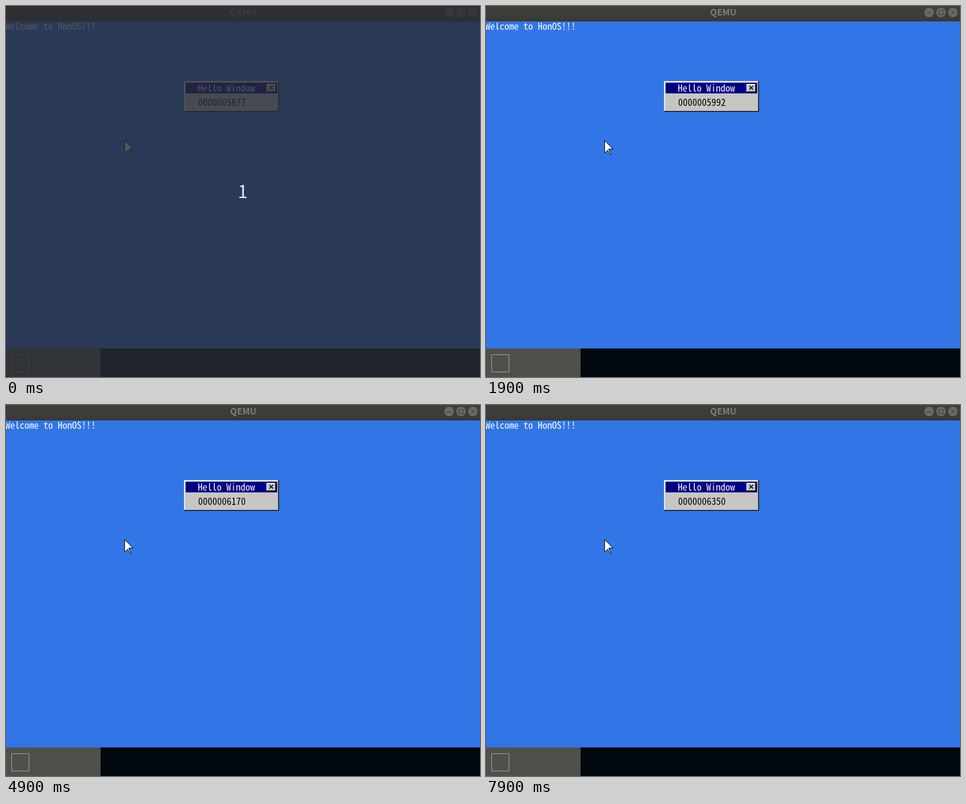
Write an HTML page that moves like this. It is 797 px wide and 624 px high and loops after 8 s.

```html
<!DOCTYPE html>
<html lang="en">
<head>
<meta charset="utf-8">
<title>QEMU desktop</title>
<style>
  html, body { margin: 0; width: 100%; height: 100%; overflow: hidden; background: #3275e6; }
  svg { display: block; width: 797px; height: 624px; }
  .mono { font: 300 16px "Noto Sans Mono CJK JP", "Noto Sans Mono", monospace; white-space: pre; }
  .ui { font-family: "Noto Sans CJK JP", "Noto Sans", sans-serif; text-anchor: middle; }
  .crisp { shape-rendering: crispEdges; }
</style>
</head>
<body>
<svg viewBox="0 0 797 624">
  <defs>
    <linearGradient id="bar" x2="0" y2="1">
      <stop stop-color="#403f3a"/>
      <stop offset="1" stop-color="#3a3934"/>
    </linearGradient>
  </defs>

  <!-- Host title bar -->
  <rect width="797" height="26" fill="url(#bar)"/>
  <text class="ui" x="399" y="16" font-size="14.67" font-weight="700" fill="#827f78">QEMU</text>
  <g fill="#6a6962">
    <circle cx="745" cy="11" r="8"/>
    <circle cx="765" cy="11" r="8"/>
    <circle cx="785" cy="11" r="8"/>
  </g>
  <path d="M741 11.5h8M761.5 7.5h7v7h-7zM782 8l6 6m0-6l-6 6" fill="none" stroke="#3c3b37"/>

  <!-- Desktop and taskbar -->
  <g class="crisp">
    <rect y="26" width="797" height="550" fill="#3275e6"/>
    <rect y="576" width="797" height="48" fill="#01080f"/>
    <rect y="576" width="159" height="48" fill="#50504b"/>
    <rect x="9.5" y="586.5" width="29" height="29" fill="none" stroke="#a0a09c"/>
  </g>
  <text class="mono" x="-1" y="40" fill="#fff">Welcome to HonOS!!!</text>

  <!-- Window -->
  <g transform="translate(299 126)">
    <g class="crisp">
      <rect width="160" height="52" fill="#000"/>
      <rect width="159" height="51" fill="#c6c6c3"/>
      <path d="M1.5 50V1.5H158" fill="none" stroke="#fff"/>
      <path d="M1 50.5H158.5V1" fill="none" stroke="#848484"/>
      <rect x="3" y="3" width="154" height="18" fill="#000084"/>
      <g transform="translate(139 5)">
        <rect width="16" height="14" fill="#000"/>
        <rect width="15" height="13" fill="#fff"/>
        <rect x="1" y="1" width="14" height="12" fill="#848484"/>
        <rect x="1" y="1" width="13" height="11" fill="#c6c6c3"/>
      </g>
    </g>
    <path d="M144 8.5l6 6m0-6l-6 6" stroke="#000" stroke-width="1.7"/>
    <text class="mono" x="23.5" y="18" fill="#fff">Hello Window</text>
    <text class="mono" id="counter" x="24" y="42" fill="#000"></text>
  </g>

  <!-- Pointer -->
  <path transform="translate(199 226)" fill="#fff" stroke="#000"
    d="M.5.5L14.5 14.5H7.5V15.5L11.5 23.5H9.5L5.5 16.5L.5 21.5Z"/>

  <!-- Recording countdown -->
  <g id="countdown">
    <rect width="797" height="624" fill="#282c33" opacity=".8"/>
    <text class="ui" x="398" y="323" font-size="30" fill="#dcebfa">1</text>
  </g>
</svg>
<script>
  const LOOP = 8000, STEP = 100;
  // The emulated counter drifts slightly around 60 counts per second: [step, value].
  const PACE = [[0, 5877], [1, 5883], [11, 5944], [28, 6045], [38, 6105], [54, 6199], [60, 6237], [79, 6350]];
  const counter = document.getElementById("counter");
  const countdown = document.getElementById("countdown");

  function countAt(step) {
    const i = Math.max(1, PACE.findIndex(([s]) => s >= step));
    const [s0, v0] = PACE[i - 1], [s1, v1] = PACE[i];
    return Math.round(v0 + (v1 - v0) * (step - s0) / (s1 - s0));
  }

  function render(ms) {
    const step = Math.floor(ms % LOOP / STEP);
    counter.textContent = String(countAt(step)).padStart(10, "0");
    countdown.style.display = step === 0 ? "" : "none";
  }

  const start = performance.now();
  function tick() {
    render(performance.now() - start);
    requestAnimationFrame(tick);
  }
  tick();
</script>
</body>
</html>
```
